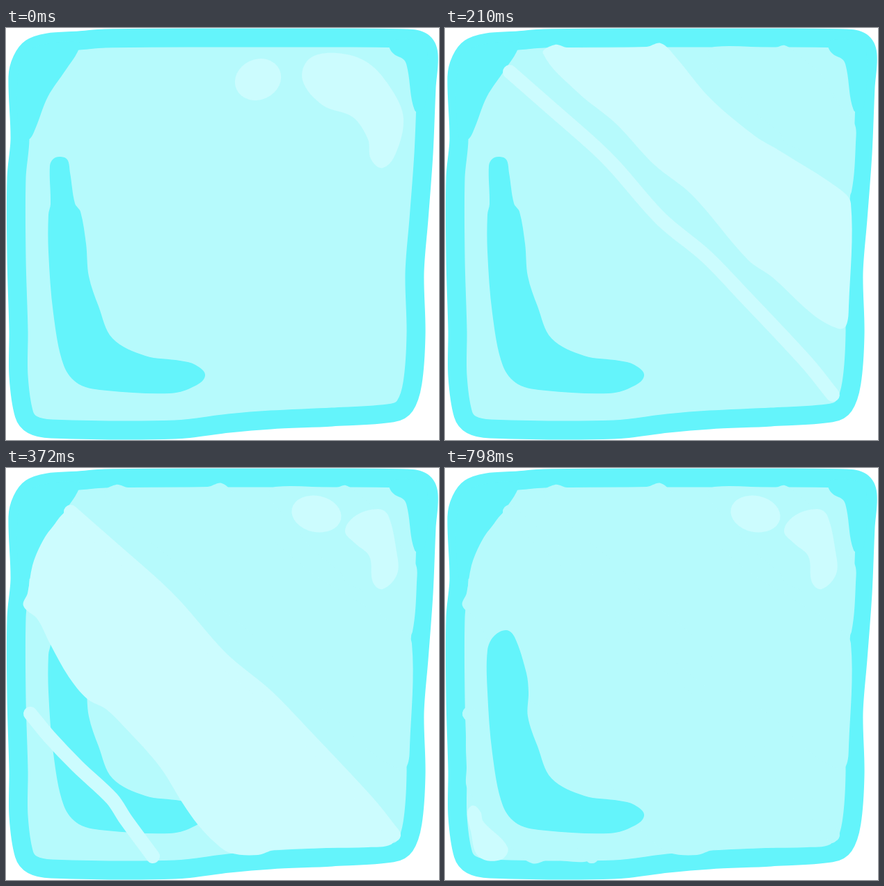
Animation of 622x592 px, one loop 0.99 s. Source, as an HTML page with a canvas:

```html
<!DOCTYPE html>
<html lang="en">
<head>
<meta charset="utf-8">
<title>Shining ice cube</title>
<style>
  html, body { margin: 0; width: 100%; height: 100%; overflow: hidden; background: #fff; }
  canvas { display: block; width: 100vw; height: 100vh; }
</style>
</head>
<body>
<canvas id="stage" width="622" height="592"></canvas>
<script>
const ctx = document.getElementById('stage').getContext('2d');
const EDGE = '#64f4fb', ICE = '#b6fafc', COOL = '#b6f9fe', SHINE = '#ccfcfe';

// Smooth curve through "x,y x,y ..."; handles never exceed a third of their segment.
function curve(text, closed) {
  const pts = text.trim().split(/\s+/).map(p => p.split(',').map(Number));
  const n = pts.length;
  const at = i => closed ? pts[(i + n) % n] : pts[Math.max(0, Math.min(n - 1, i))];
  const dir = i => {
    const a = at(i - 1), b = at(i + 1);
    const dx = b[0] - a[0], dy = b[1] - a[1], len = Math.hypot(dx, dy) || 1;
    return [dx / len, dy / len];
  };
  const path = new Path2D();
  path.moveTo(...pts[0]);
  for (let i = 0; i < (closed ? n : n - 1); i++) {
    const a = at(i), b = at(i + 1), u = dir(i), v = dir(i + 1);
    const h = Math.hypot(b[0] - a[0], b[1] - a[1]) / 3;
    path.bezierCurveTo(a[0] + u[0] * h, a[1] + u[1] * h, b[0] - v[0] * h, b[1] - v[1] * h, b[0], b[1]);
  }
  if (closed) path.closePath();
  return path;
}

const blob = text => ({ path: curve(text, true) });
const brush = (text, width) => ({ path: curve(text, false), width });
function oval(x, y, rx, ry, deg) {
  const path = new Path2D();
  path.ellipse(x, y, rx, ry, deg * Math.PI / 180, 0, 2 * Math.PI);
  return { path };
}

// The frame is one brush stroke around the pane, with two corners filled in.
const pane = blob(`105,18 142,15 300,14 440,14 575,15 598,20 607,38 604,85 600,180 593,275 587,352
  589,440 584,510 573,543 555,553 468,559 380,563 320,568 243,577 65,576 38,570 26,555 18,500
  18,435 15,330 15,215 20,160 17,70 23,46 36,29 60,21`);
const rim = { path: pane.path, width: 27 };
const corners = [
  blob('105,20 103,34 86,60 60,99 42,145 33,160 20,160 18,60 36,30'),
  blob('551,18 551,29 558,38 572,46 577,60 587,118 600,120 606,40 595,20')
];

// Dark reflection: same body, full or shortened tip.
const body = `119,357 133,400 153,446 200,471 250,478 272,484 286,500 266,517 235,525 145,521
  105,512 83,485 68,410 61,322 `;
const tallShade = blob(body + '61,268 64,253 63,198 68,188 77,185 88,189 92,208 99,252 107,264 115,310');
const shortShade = blob(body + '61,262 70,242 88,233 100,243 117,295 120,322');

const spot = oval(362, 74, 34, 29, -25);
const bean = blob(`426,75 436,44 475,36 520,50 555,90 571,130 560,180 541,201 524,188 520,160
  498,128 455,111`);
const pair = [
  oval(446, 66, 36, 26, 12),
  blob('487,90 503,68 535,59 549,68 561,120 562,152 541,174 527,164 522,127 500,107')
];

const cornerBand = blob(`377,38 387,27 475,28 488,25 507,38 545,72 560,103 588,137 590,165 584,235
  574,246 563,241 512,177 490,166 480,150 440,117 413,83`);
const wideBand = blob(`141,37 158,24 175,28 290,27 310,22 330,40 380,100 445,155 480,176 565,230
  583,252 580,400 576,428 565,432 530,413 470,358 435,333 355,240 300,196 245,137 190,92`);

// Each thin line grows into a wide band that keeps the line as its upper edge.
const longPts = '93,63 150,113 215,170 245,200 310,274 375,328 430,385 520,481 557,527 ';
const shortPts = '35,353 62,386 103,429 152,475 172,505 211,558 ';
const longLine = brush(longPts, 20), shortLine = brush(shortPts, 20);
const midBand = blob(longPts + `553,541 520,545 460,546 385,549 362,556 322,553 300,538 276,513
  254,482 220,428 168,370 143,346 117,332 90,300 64,254 45,217 25,198 31,180 38,140 50,110 65,87`);
const lowBand = blob(shortPts + `200,566 150,563 125,568 95,545 45,480 31,458 31,430 30,400 31,375`);
const glint = blob('32,495 40,485 51,494 55,508 90,545 80,563 48,558 37,522');

const steps = [
  { ms: 120, sweep: [bean], spots: [spot], shade: tallShade },
  { ms: 90, sweep: [cornerBand], spots: [spot], shade: tallShade, ice: COOL },
  { ms: 90, sweep: [wideBand, longLine], spots: [], shade: tallShade },
  { ms: 120, sweep: [midBand, longLine, shortLine], spots: pair, shade: tallShade },
  { ms: 90, sweep: [lowBand, shortLine], spots: pair, shade: shortShade },
  { ms: 480, sweep: [glint], spots: pair, shade: shortShade }
];
const loop = steps.reduce((sum, s) => sum + s.ms, 0);

function paint(color, ...shapes) {
  ctx.fillStyle = ctx.strokeStyle = color;
  for (const { path, width } of shapes) {
    if (!width) ctx.fill(path);
    else {
      ctx.lineWidth = width;
      ctx.stroke(path);
    }
  }
}

// Past sweeps leave plain ice behind, nibbling at the rim.
function draw(step) {
  const { ice = ICE, sweep, spots, shade } = step;
  const worn = steps.slice(0, steps.indexOf(step)).flatMap(s => s.sweep);
  ctx.clearRect(0, 0, 622, 592);
  ctx.lineCap = ctx.lineJoin = 'round';
  paint(ice, pane);
  paint(EDGE, rim, ...corners);
  paint(ice, ...worn);
  paint(EDGE, shade);
  paint(SHINE, ...sweep, ...spots);
}

function stepAt(t) {
  t %= loop;
  return steps.find(s => (t -= s.ms) < 0);
}

const start = performance.now();
let shown = null;
function tick(now) {
  const step = stepAt(Math.max(0, now - start));
  if (step !== shown) draw(shown = step);
  requestAnimationFrame(tick);
}
tick(start);
</script>
</body>
</html>
```
